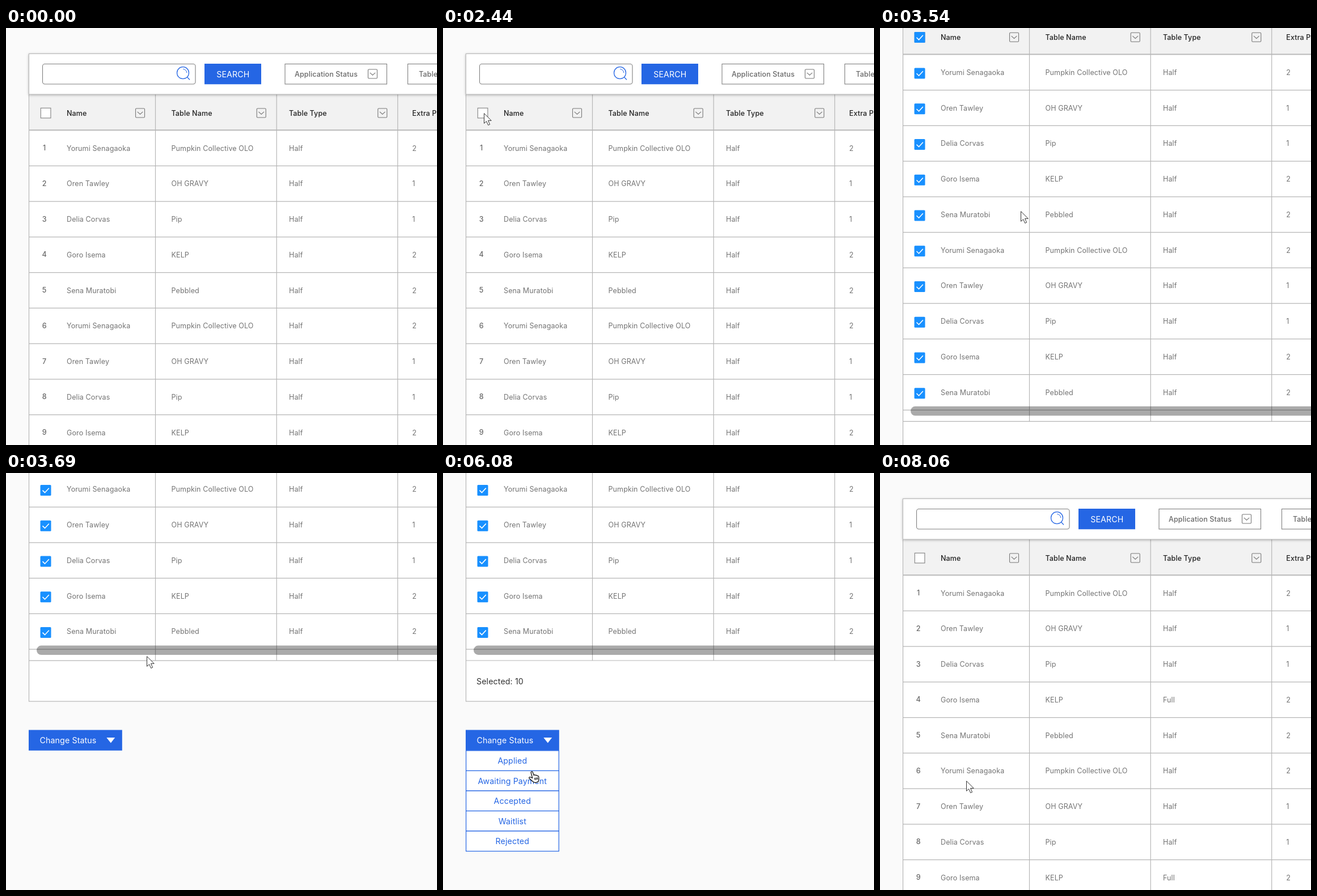
Animation, 760 px wide and 736 px high, one loop 8.6 s. Source, as an HTML page:

```html
<!DOCTYPE html>
<html lang="en">
<head>
<meta charset="utf-8">
<title>Application table</title>
<style>
  html, body { margin: 0; width: 100%; height: 100%; overflow: hidden; background: #fafafa; }
  svg { display: block; width: 760px; height: 736px; }
  text { font: 400 12.5px Inter, "Noto Sans", sans-serif; letter-spacing: .12px; fill: #747474; white-space: pre; }
  .mid { font-weight: 500; fill: #686868; }
  .head { font-weight: 500; fill: #222; }
  .big { font-size: 14.2px; fill: #333; }
  .white { fill: #fff; }
  .blue { fill: #2566e4; }
  .line { fill: none; stroke: #b6b6b6; stroke-width: 1.2; }
  .box { fill: #fff; stroke: #808080; stroke-width: 1.1; }
  .icon { fill: none; stroke: #777; stroke-width: 1.1; }
  .lens { fill: none; stroke: #2566e4; stroke-width: 1.25; stroke-linecap: round; }
  .item { fill: #fff; stroke: #2566e4; stroke-width: 1.2; }
  .bar { filter: drop-shadow(0 1.5px 2px rgba(0, 0, 0, .28)); }
</style>
</head>
<body>
<svg id="stage" viewBox="0 0 760 736"></svg>
<script>
const LOOP = 8600, SCROLL = 497, PITCH = 62.75, BLUE = '#2566e4';
const people = ['Yorumi Senagaoka', 'Oren Tawley', 'Delia Corvas', 'Goro Isema', 'Sena Muratobi'];
const tables = ['Pumpkin Collective OLO', 'OH GRAVY', 'Pip', 'KELP', 'Pebbled'];
const extras = [2, 1, 1, 2, 2];
const statuses = ['Applied', 'Awaiting Payment', 'Accepted', 'Waitlist', 'Rejected'];
const rows = [...Array(10).keys()];
const columns = [263.5, 477.2, 690.7];

// y is the middle of the capital letters
const text = (x, y, s, cls = '', more = '') =>
  `<text x="${x}" y="${y + (/big/.test(cls) ? 5.1 : 4.5)}" class="${cls}" ${more}>${s}</text>`;
const rect = (x, y, w, h, attrs) => `<rect x="${x}" y="${y}" width="${w}" height="${h}" ${attrs}/>`;
const path = (d, attrs) => `<path d="${d}" ${attrs}/>`;
const drop = (x, y) => rect(x - 8, y - 8, 16, 16, 'class="icon" rx="1.5"') +
  path(`M${x - 4.8} ${y - 2.2}l4.8 4.4l4.8-4.4`, 'class="icon"');
const tick = y => rect(60.5, y - 9.5, 19, 19, 'fill="#1890ff" rx="1.5"') +
  path(`M64.5 ${y + .2}l4 4l7.3-8`, 'fill="none" stroke="#fff" stroke-width="1.6"');
const centred = 'text-anchor="middle"';

function sheet(type) {
  const line = y => path(`M40 ${y}H770`, 'class="line"');
  return rect(0, 0, 760, 1300, 'fill="#fafafa"') +
    rect(40.5, 45.5, 740, 854.5, 'fill="#fff" stroke="#b6b6b6" stroke-width="1.2"') +
    rect(41, 117, 730, 63, 'fill="#f2f2f2"') +
    path('M40 180.3H770', 'stroke="#bababa" stroke-width="2"') +
    rows.map(i => line(243.3 + i * PITCH)).join('') + line(828) +
    columns.map(x => path(`M${x} 117V828`, 'class="line"')).join('') +
    // search bar
    rect(40.5, 45.5, 740, 71.5, 'class="bar" fill="#fff" stroke="#bbb"') +
    rect(64.5, 63.5, 269.5, 35.5, 'class="box" rx="4"') +
    '<circle class="lens" cx="312" cy="79.2" r="10.5"/>' +
    path('M319.6 86.8l4 4.2', 'class="lens"') +
    path('M312.6 72.4a6.8 6.8 0 0 1 6.2 6.4', 'class="lens" style="stroke-width:1"') +
    rect(350, 63, 100, 36.3, `fill="${BLUE}"`) +
    text(400.3, 81.5, 'SEARCH', 'big white', centred) +
    rect(492, 63.5, 179.5, 35.5, 'class="box"') + text(509, 81.2, 'Application Status', 'mid') + drop(646.5, 81) +
    rect(708.5, 63.5, 180, 35.5, 'class="box"') + text(728, 81.2, 'Table Type', 'mid') +
    // header
    rect(61.3, 141.3, 17.6, 17.6, 'class="box"') +
    [[107, 'Name'], [291.5, 'Table Name'], [499, 'Table Type'], [716.3, 'Extra People']]
      .map(([x, s]) => text(x, 150.3, s, 'head')).join('') +
    [236.5, 450.2, 663.8].map(x => drop(x, 150)).join('') +
    // rows
    rows.map(i => {
      const y = 212 + i * PITCH, k = i % 5;
      return text(107, y, people[k]) + text(291.5, y, tables[k]) +
        text(499, y, k == 3 ? type : 'Half') + text(716.3, y, extras[k]);
    }).join('') +
    '<g class="nums">' + rows.map(i => text(67.7, 211.5 + i * PITCH, i + 1, 'mid', centred)).join('') + '</g>' +
    rect(54, 801.5, 800, 16.5, 'rx="8.2" fill="#000" fill-opacity=".335"') +
    // status button
    rect(40, 950.5, 164.8, 36.3, `fill="${BLUE}"`) +
    text(59.5, 969, 'Change Status', 'big white') +
    path('M177.3 964H192.2L184.8 973.5Z', 'fill="#fff"');
}

const menu = text(59, 865, 'Selected: 10', 'big') + statuses.map((s, i) => {
  const y = 987 + i * 35.5;
  return rect(40.6, y, 163.7, 35.5, 'class="item"') + text(122.3, y + 18, s, 'big blue', centred);
}).join('');

const $ = s => document.querySelector(s);
$('#stage').innerHTML =
  `<g id="page">${sheet('Half')}<g id="ticks">${tick(150.3)}${rows.map(i => tick(213.7 + i * PITCH)).join('')}</g>` +
  `<g id="menu">${menu}</g></g><g id="next">${sheet('Full')}</g><g id="cursor">` +
  path('M.5.7V18.3L4.6 14.6L7.7 21.5L10.6 20.2L7.5 13.4H13.2Z', 'id="arrow" fill="#fff" stroke="#333"') +
  path('M4.2 3C3.6 1 6.4 0 7.2 2L9.2 7.6C10 6.3 12 6.4 12.4 7.8C13.4 6.9 15 7.3 15.3 8.7' +
    'C16.5 8.2 17.6 9 17.8 10.4C18.4 13 18.4 15.4 17.2 18.2C15 20.6 11 20.9 8.6 19.5' +
    'C6.6 17.6 4 15.6 1.3 13.2C-.2 11.6 1.8 9.9 3.6 11L6.7 12.4Z' +
    'M10.6 12l1 4M13 11.6l.9 3.8M15.3 11.2l.7 3.6',
    'id="hand" transform="translate(-4)" fill="#fff" stroke="#111" stroke-width="1.3" stroke-linejoin="round"') + '</g>';

// time, x, y of the pointer tip
const route = [
  [760, 313, 3], [1620, 64, 149], [1850, 57, 136], [2080, 66, 150], [2439, 66, 150], [2440, 72, 150],
  [2900, 72, 150], [3130, 248, 323], [4030, 248, 323], [4820, 188, 463], [4870, 188, 458], [4949, 188, 458],
  [4950, 179, 451], [5300, 179, 451], [5570, 189, 465], [5790, 189, 465], [6080, 155, 526], [6490, 152, 543],
  [6769, 152, 543], [6770, 142, 529], [6849, 142, 529], [6850, 152, 543], [LOOP, 152, 543]
];

function ease(t, from, to) {
  const u = Math.min(1, Math.max(0, (t - from) / (to - from)));
  return u * u * (3 - 2 * u);
}

function pointer(t) {
  const i = Math.max(1, route.findIndex(p => p[0] > t));
  const [a, ax, ay] = route[i - 1], [b, bx, by] = route[i], u = ease(t, a, b);
  return [ax + (bx - ax) * u, ay + (by - ay) * u];
}

const show = (s, alpha) => {
  const el = $(s);
  el.style.opacity = alpha;
  el.style.display = alpha > 0 ? '' : 'none';
};

function draw(t) {
  const checked = ease(t, 2560, 2750), [x, y] = pointer(t);
  const hand = y > 450 && t < 7700;
  $('#page').setAttribute('transform', `translate(0 ${-SCROLL * ease(t, 3463, 3692)})`);
  show('#ticks', checked);
  show('#page .nums', 1 - checked);
  show('#menu', ease(t, 5070, 5300));
  show('#next', ease(t, 7690, 8050));
  show('#cursor', t >= 780 ? 1 : 0);
  show('#hand', hand ? 1 : 0);
  show('#arrow', hand ? 0 : 1);
  $('#cursor').setAttribute('transform', `translate(${x} ${y})`);
}

const start = performance.now();
function frame() {
  draw((performance.now() - start) % LOOP);
  requestAnimationFrame(frame);
}
frame();
</script>
</body>
</html>
```
